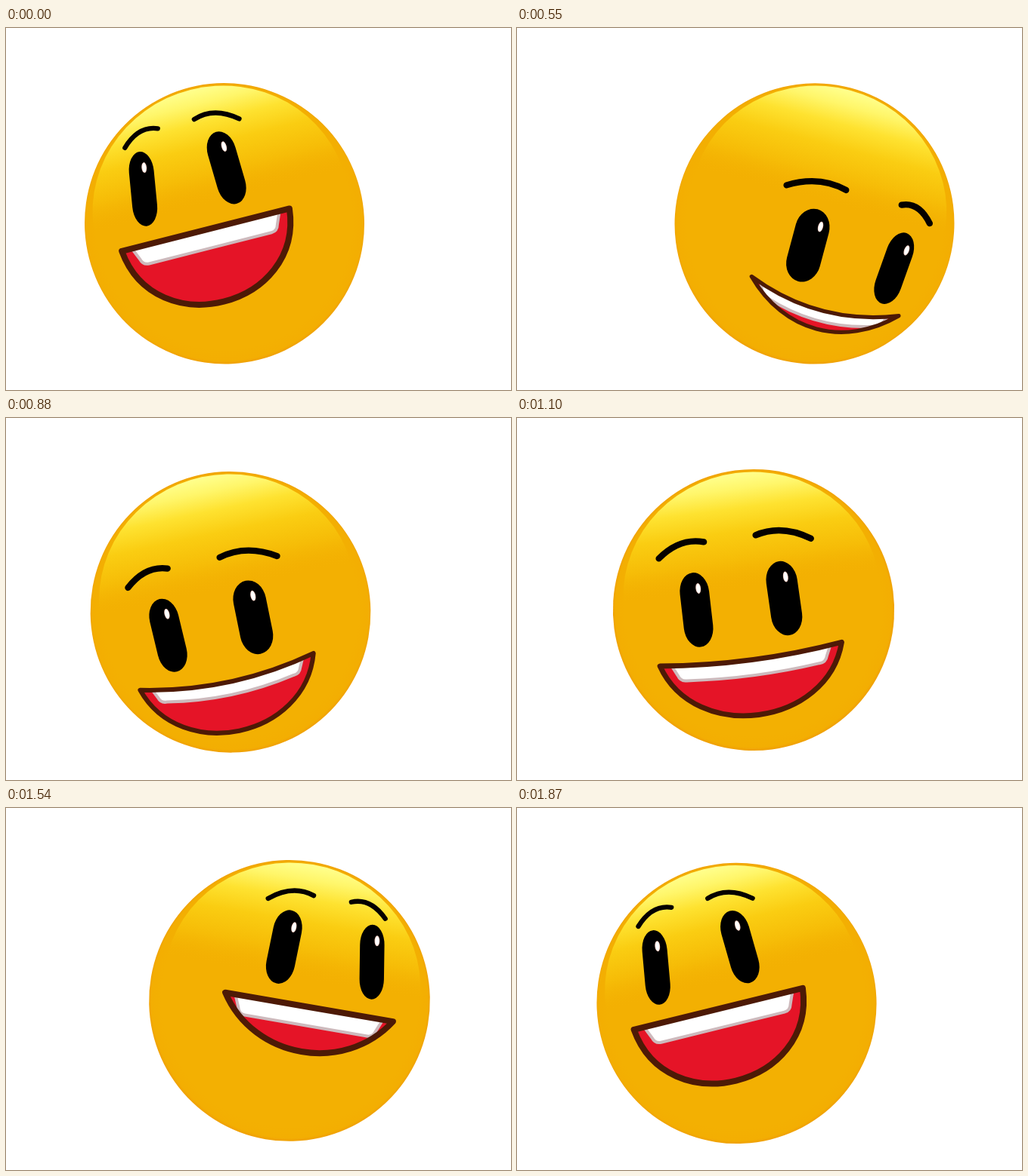
Recreate the animation shown at these times as an HTML page with a canvas. Size 668 by 480 pixels, loop 1980 ms.

```html
<!DOCTYPE html>
<html lang="en">
<head>
<meta charset="utf-8">
<title>Rocking smiley</title>
<style>
  html, body { margin: 0; width: 100%; height: 100%; overflow: hidden; background: #fff; }
  canvas { display: block; }
</style>
</head>
<body>
<canvas id="stage" width="668" height="480"></canvas>
<script>
const ctx = document.getElementById('stage').getContext('2d');
const STEP = 110, R = 186;

// One pose per step: head position, eye height on the head, mouth depth
const headX = [289, 304, 336, 371, 394.5, 393.5, 365, 326, 297, 289, 313, 349, 380, 390, 375, 345, 309, 290.5];
const eyeY = [-71, -64, -44, -14, 14, 30, 31, 22, 13, 2, -10, -30, -49, -62, -69, -71.5, -73, -71.5];
const mouthDepth = [98, 92, 80, 62, 48, 45, 52, 65, 80, 88, 81, 65, 50, 50, 60, 73, 90, 98];

const rad = deg => deg * Math.PI / 180;

function gradient(g, stops) {
  stops.forEach(([at, color]) => g.addColorStop(at, color));
  return g;
}

const gloss = gradient(ctx.createLinearGradient(0, -182, 0, -30), [
  [0, '#ffff8c'], [0.13, '#fff66a'], [0.3, '#fee230'], [0.5, '#facd12'], [0.75, '#f6bc07'], [1, 'rgba(243,176,2,0)']
]);
const rim = gradient(ctx.createRadialGradient(0, -3, 170, 0, 0, 187), [
  [0, '#f3b002'], [0.75, '#f3ae02'], [1, '#ef9d05']
]);

function ellipse(x, y, rx, ry, fill) {
  ctx.beginPath();
  ctx.ellipse(x, y, rx, ry, 0, 0, 2 * Math.PI);
  ctx.fillStyle = fill;
  ctx.fill();
}

function stroke(color, width) {
  ctx.strokeStyle = color;
  ctx.lineWidth = width;
  ctx.stroke();
}

function drawHead(dx) {
  const turn = Math.abs(dx);
  ellipse(0, 0, 187.5 - turn * 0.05, 187 - turn * 0.015, rim);
  ellipse(0, -20, 170, 163, gloss);
}

function drawEye(x, y, shift) {
  const w = (43 + 0.07 * y) * Math.sqrt(1 - (x / R) ** 2), h = 99;
  const shineX = w * (0.16 + 0.001 * shift);
  ctx.save();
  ctx.translate(x, y);
  ctx.rotate(0.8 * x * y / R ** 2);
  ctx.beginPath();
  ctx.roundRect(-w / 2, -h / 2, w, h, { x: w / 2, y: h * 0.27 });
  ctx.fillStyle = '#000';
  ctx.fill();
  ellipse(shineX, -28, 3.4, 7, '#f5cfc4');
  ellipse(shineX, -28, 2.5, 6, '#fff');
  ctx.restore();
}

function drawBrow(side, shift, y) {
  const squeeze = Math.min(1, 1 + 0.004 * (y + 10));
  const x = squeeze * (shift + side * 68);
  const half = 39 * squeeze * (1 - (x / R) ** 2);
  const top = y - 90 + 0.0035 * (y + 5) ** 2;
  ctx.beginPath();
  ctx.moveTo(x + side * half, top + 16);
  ctx.quadraticCurveTo(x, top - 8, x - side * half, top + 2);
  stroke('#050100', 8.3 * squeeze);
}

function drawMouth(x, y, w, depth, bend) {
  const sag = 0.0018 * bend, teeth = 25 - 0.001 * bend;
  const k = w * depth * 0.009;
  const outline = () => {
    ctx.beginPath();
    ctx.moveTo(-w, 0);
    ctx.quadraticCurveTo(0, sag * 2, w, 0);
    ctx.bezierCurveTo(k, depth * 4 / 3, -k, depth * 4 / 3, -w, 0);
    ctx.closePath();
  };
  ctx.save();
  ctx.translate(x, y);
  ctx.save();
  outline();
  ctx.fillStyle = '#e51427';
  ctx.fill();
  ctx.clip();
  const low = teeth + sag * 0.4;
  ctx.beginPath();
  ctx.moveTo(-w * 0.88, 0);
  ctx.lineTo(-w * 0.82, low * 0.65);
  ctx.quadraticCurveTo(-w * 0.8, low, -w * 0.73, low);
  ctx.quadraticCurveTo(0, teeth + sag * 1.6, w * 0.73, low);
  ctx.quadraticCurveTo(w * 0.8, low, w * 0.82, low * 0.65);
  ctx.lineTo(w * 0.88, 0);
  ctx.closePath();
  ctx.fillStyle = '#fff';
  ctx.fill();
  stroke('#cdbabd', 4);
  ctx.restore();
  outline();
  stroke('#4d1a06', 8 - 0.00025 * bend);
  ctx.restore();
}

function draw() {
  const i = Math.floor(performance.now() / STEP) % headX.length;
  const dx = headX[i] - 341, y = eyeY[i];
  const shift = 8 + 0.9 * dx + 0.001 * dx * dx;
  const bend = (y + 75) ** 2;
  const gap = 59 + Math.min(0, shift + 10) * 0.08;

  ctx.fillStyle = '#fff';
  ctx.fillRect(0, 0, 668, 480);
  ctx.lineCap = ctx.lineJoin = 'round';
  ctx.save();
  ctx.translate(headX[i], 252.5 + 0.0025 * dx * dx);
  ctx.rotate(rad(0.28 * dx + 0.3));
  drawHead(dx);
  for (const side of [-1, 1]) {
    drawEye(shift + side * gap, y, shift);
    drawBrow(side, shift, y);
  }
  drawMouth(6 + 0.62 * dx, y + 73 - 0.00125 * bend, 123 - 0.0066 * shift ** 2, mouthDepth[i], bend);
  ctx.restore();
  requestAnimationFrame(draw);
}
draw();
</script>
</body>
</html>
```
